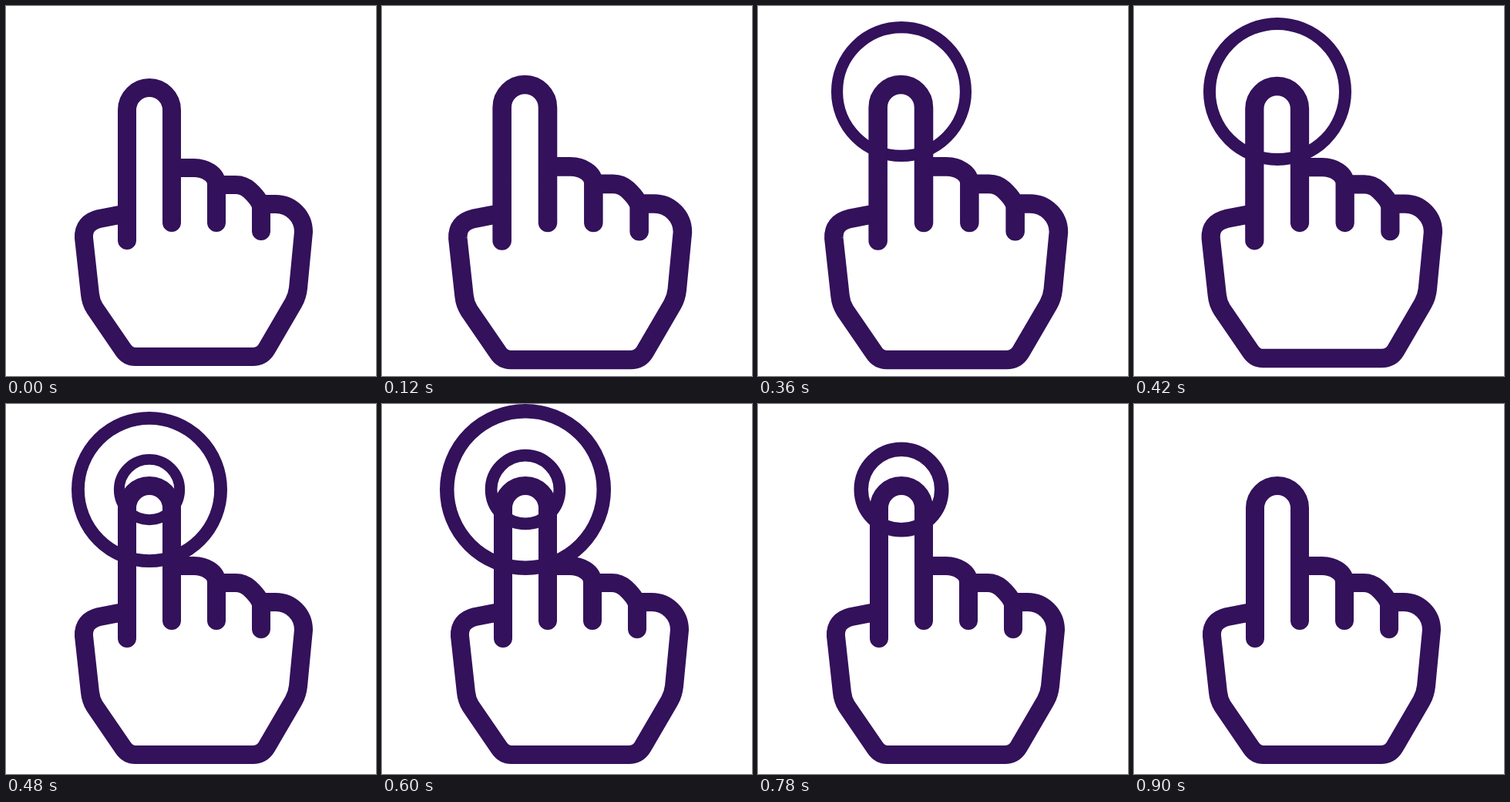
These frames come from a looping animation (480 px wide and 480 px high, 0.96 s). An HTML page with a canvas:

```html
<!DOCTYPE html>
<html lang="en">
<head>
<meta charset="utf-8">
<title>Tap</title>
<style>
  html, body { margin: 0; width: 100%; height: 100%; overflow: hidden; background: #fff; }
  canvas { display: block; width: 480px; height: 480px; }
</style>
</head>
<body>
<canvas id="stage" width="480" height="480"></canvas>
<script>
const ctx = document.getElementById('stage').getContext('2d');
const INK = '#33115b';
const LOOP = 960;
const STEP = 60;

const hand = new Path2D(`
  M157 304 V135 A29 29 0 0 1 215 135 V281
  M215 210 H244 C258 210 273 218 273 231 V281
  M273 232 H298 Q308 232 316 239 Q331 253 331 262 V292
  M331 257 H350 A36 36 0 0 1 386 293 L379 366 Q378 376 373 385
  L338 445 Q332 455 320 455 H168 Q158 455 152 446
  L115 392 Q110 384 109 374 L101 301 Q100 281 121 276 L157 269`);

// Each ring grows linearly to its full radius, then vanishes.
const rings = [
  { from: 300, to: 600, startScale: 0.775, radius: 111 },
  { from: 480, to: 780, startScale: 0.75, radius: 61.5 }
];
const RING_WIDTH = 18.5;

function drawRing({ from, to, startScale, radius }, t) {
  if (t < from || t > to) return;
  const scale = startScale + (1 - startScale) * (t - from) / (to - from);
  const width = RING_WIDTH * scale;
  ctx.lineWidth = width;
  ctx.beginPath();
  ctx.arc(186, 111, radius * scale - width / 2, 0, Math.PI * 2);
  ctx.stroke();
}

function drawHand(t) {
  const swell = Math.max(0, 1 - Math.abs(t - 240) / 240);
  const scale = 1 + 0.046 * swell;
  ctx.save();
  ctx.translate(215, 280.5);
  ctx.scale(scale, scale);
  ctx.translate(-215, -280.5);
  ctx.lineWidth = 24;
  ctx.stroke(hand);
  ctx.restore();
}

function draw(now) {
  const t = Math.floor((now % LOOP) / STEP) * STEP;
  ctx.fillStyle = '#fff';
  ctx.fillRect(0, 0, 480, 480);
  ctx.strokeStyle = INK;
  ctx.lineCap = ctx.lineJoin = 'round';
  rings.forEach(ring => drawRing(ring, t));
  drawHand(t);
}

const start = performance.now();
function tick() {
  draw(performance.now() - start);
  requestAnimationFrame(tick);
}
tick();
</script>
</body>
</html>
```
